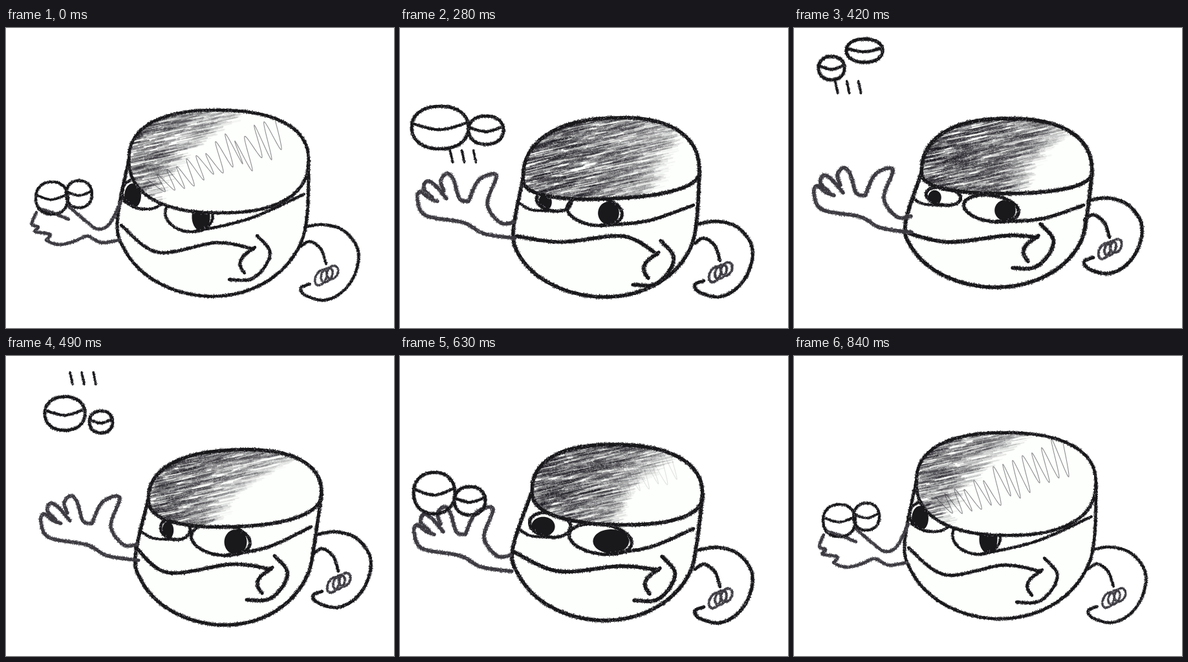
These frames come from a looping animation (600 by 464 pixels, 0.91 s). An HTML page with a canvas:

```html
<!DOCTYPE html>
<html lang="en">
<head>
<meta charset="utf-8">
<title>Juggling pot</title>
<style>
  html, body { margin: 0; width: 100%; height: 100%; overflow: hidden; background: #fff; }
  canvas { display: block; width: 600px; height: 464px; }
</style>
</head>
<body>
<canvas id="stage" width="600" height="464"></canvas>
<script>
const W = 600, H = 464, STEP = 70, TAU = Math.PI * 2;
const INK = "#19181b", SOFT = "#3d3b41";

// The three hands share their point counts, so one can turn into another.
const grip = {
  thumb: [97,276, 112,289, 125,300, 142,311, 160,303, 178,268],
  finger: [47,285, 40,303, 50,308, 45,315, 68,319, 62,328],
  little: [50,279, 62,283, 72,286, 85,291, 97,296],
  wrist: [62,328, 72,333, 85,335, 105,330, 125,322, 138,328, 150,332, 176,328]
};
const fist = {
  thumb: [102,326, 107,308, 116,306, 131,326, 156,320, 182,292],
  finger: [61,318, 66,328, 72,335, 80,337, 88,336, 100,326],
  little: [45,326, 51,333, 58,337, 63,342, 68,347],
  wrist: [62,318, 44,322, 32,350, 50,368, 85,374, 136,350, 155,356, 182,350]
};
const open = {
  thumb: [106,268, 122,235, 149,228, 135,272, 155,301, 177,300],
  finger: [68,252, 63,236, 73,225, 83,235, 92,264, 106,268],
  little: [50,262, 37,249, 41,237, 53,242, 72,264],
  wrist: [58,268, 45,263, 31,253, 27,266, 40,290, 98,301, 130,318, 178,325]
};
const ARM = [462,308, 490,304, 520,312, 541,335, 545,360, 535,390, 515,412, 490,421, 462,413, 456,402, 470,396];
const ELBOW = [456,338, 470,330, 487,342, 495,365];

// dome: left x, y, right x, y, top, bottom; belly: left, right, bottom;
// eyes and balls: centre and radii; shade: reach at top and bottom, tone, loops.
const hold = {
  ink: 4.9, shift: [0, 0], dome: [190,203, 468,205, 127,286], belly: [172,466,415],
  eyeL: [213,256,34,24], eyeR: [283,288,37,27], pupil: 1,
  mouth: [178,305, 235,347, 325,332, 383,342],
  hand: grip, palm: [0, 0], arm: [0, 0],
  ballA: [71,263,25,25], ballB: [113,257,20,21], speed: 0, shade: [.68,.16,.75,1]
};
const dip = {
  ink: 6.6, shift: [0, 0], dome: [205,213, 471,208, 139,284], belly: [175,464,417],
  eyeL: [230,269,36,14], eyeR: [309,300,41,24], pupil: 1,
  mouth: [178,320, 240,340, 340,333, 405,347],
  hand: fist, palm: [0, 0], arm: [4, 9],
  ballA: [65,298,25,20], ballB: [112,300,23,18], speed: 0, shade: [.95,.5,.5,.25]
};
const toss = {
  ink: 5.8, shift: [0, 0], dome: [190,234, 463,222, 139,264], belly: [175,459,416],
  eyeL: [238,267,27,16], eyeR: [301,283,43,22], pupil: 1,
  mouth: [180,322, 250,331, 345,322, 398,350],
  hand: open, palm: [0, 0], arm: [0, -5],
  ballA: [62,154,44,33], ballB: [133,158,27,22], speed: 1, shade: [1,.75,.85,0]
};
const peak = {
  ink: 6, shift: [0, 0], dome: [197,224, 461,222, 140,256], belly: [172,453,401],
  eyeL: [231,260,27,14], eyeR: [305,279,43,20], pupil: 1,
  mouth: [178,318, 240,331, 330,321, 376,324],
  hand: open, palm: [4, -9], arm: [-7, -41],
  ballA: [109,35,28,18], ballB: [58,62,20,18], speed: 1, shade: [1,.6,.9,0]
};
const fall = {
  ink: 5.6, shift: [0, 0], dome: [220,222, 488,212, 145,264], belly: [200,477,416],
  eyeL: [262,267,23,17], eyeR: [332,284,46,24], pupil: 1,
  mouth: [200,295, 250,335, 350,322, 410,330],
  hand: open, palm: [27, -9], arm: [19, -32],
  ballA: [91,89,31,26], ballB: [147,102,18,17], speed: -1, shade: [1,.4,.75,0]
};
const grab = {
  ink: 5.9, shift: [0, 0], dome: [204,210, 468,215, 137,261], belly: [174,459,409],
  eyeL: [232,261,32,19], eyeR: [310,283,49,23], pupil: 1.5,
  mouth: [176,303, 245,333, 340,325, 400,331],
  hand: open, palm: [-5, 8], arm: [0, -8],
  ballA: [53,212,32,32], ballB: [108,224,24,22], speed: 0, shade: [1,.5,.85,.25]
};
const lift = { ...hold, shift: [-1, -8.5] };

// Key poses and the step of the loop at which each is reached.
const keys = [[0, hold], [2, dip], [4, toss], [6, peak], [7, fall], [9, grab], [12, lift]];
const STEPS = 13;

function mix(a, b, t) {
  if (typeof a === "number") return a + (b - a) * t;
  const out = Array.isArray(a) ? [] : {};
  for (const k in a) out[k] = mix(a[k], b[k], t);
  return out;
}

function poseAt(step) {
  const i = Math.max(1, keys.findIndex(k => k[0] >= step));
  const [s0, a] = keys[i - 1], [s1, b] = keys[i];
  return mix(a, b, (step - s0) / (s1 - s0));
}

function random(seed) {
  return () => {
    seed = (seed + 0x6D2B79F5) | 0;
    let r = Math.imul(seed ^ (seed >>> 15), 1 | seed);
    r = (r + Math.imul(r ^ (r >>> 7), 61 | r)) ^ r;
    return ((r ^ (r >>> 14)) >>> 0) / 4294967296;
  };
}

const power = (v, n) => Math.sign(v) * Math.abs(v) ** (2 / n);

function pairs(flat, dx = 0, dy = 0) {
  const out = [];
  for (let i = 0; i < flat.length; i += 2) out.push([flat[i] + dx, flat[i + 1] + dy]);
  return out;
}

// Catmull-Rom curve through the points.
function spline(p) {
  const at = i => p[Math.max(0, Math.min(p.length - 1, i))], out = [];
  for (let i = 0; i < p.length - 1; i++)
    for (let k = 0; k < 12; k++) {
      const t = k / 12;
      out.push([0, 1].map(c => {
        const [a, b, d, e] = [at(i - 1), at(i), at(i + 1), at(i + 2)].map(v => v[c]);
        return b + .5 * t * (d - a + t * (2 * a - 5 * b + 4 * d - e + t * (3 * (b - d) + e - a)));
      }));
    }
  out.push(at(p.length));
  return out;
}

// Closed rounded outline, from a plain ellipse (n = 2) to a boxier one.
function ring([cx, cy, rx, ry], n = 2, tilt = 0) {
  const out = [];
  for (let i = 0; i <= 48; i++) {
    const a = i / 48 * TAU, x = power(Math.cos(a), n) * rx, y = power(Math.sin(a), n) * ry;
    out.push([cx + x * Math.cos(tilt) - y * Math.sin(tilt), cy + x * Math.sin(tilt) + y * Math.cos(tilt)]);
  }
  return out;
}

function domeLine([x0, y0, x1, y1, top, bottom]) {
  const mid = (y0 + y1) / 2;
  return ring([0, 0, 1, 1], 2.35).map(([u, v]) => [
    mix(x0, x1, (u + 1) / 2),
    mix(y0, y1, (u + 1) / 2) + v * (v < 0 ? mid - top : bottom - mid)
  ]);
}

function bellyLine([x0, y0, x1, y1], [left, right, bottom]) {
  const pts = [[x0, y0]], yl = mix(y0, bottom, .45), yr = mix(y1, bottom, .38);
  for (let i = 0; i <= 8; i++) {
    const a = Math.PI * (1 - i / 8), u = (Math.cos(a) + 1) / 2, y = mix(yl, yr, u);
    pts.push([mix(left, right, u), y + Math.sin(a) * (bottom - y)]);
  }
  return spline([...pts, [x1, y1]]);
}

function trace(g, pts) {
  g.beginPath();
  pts.forEach(([x, y]) => g.lineTo(x, y));
}

function crayon(g, pts, width, rnd, color = INK) {
  g.strokeStyle = color;
  g.lineWidth = width * .9;
  trace(g, pts);
  g.stroke();
  for (let i = 1; i < pts.length; i++) {
    const [x, y] = pts[i - 1], dx = pts[i][0] - x, dy = pts[i][1] - y;
    const len = Math.hypot(dx, dy) || 1;
    for (let n = Math.ceil(len * 3); n > 0; n--) {
      const t = rnd(), off = (rnd() - .5) * width * 1.3;
      g.fillStyle = rnd() < .13 ? "#a9a7af" : color;
      g.fillRect(x + dx * t - dy / len * off - .5, y + dy * t + dx / len * off - .5, 1, 1);
    }
  }
}

// Pencil hatching fades from the upper left of the dome, then loose loops.
function hatch(g, [x0, , x1, , y0, y1], [top, bottom, dark, loops], rnd) {
  const w = x1 - x0, h = y1 - y0;
  g.strokeStyle = "#1d1b22";
  for (let i = 0; i < 1500; i++) {
    const u = rnd(), v = rnd();
    const tone = 1 - u / mix(bottom, top, (1 - v) ** 2);
    if (tone <= 0) continue;
    const x = x0 + u * w, y = y0 + v * h, l = 8 + rnd() * 12;
    g.globalAlpha = Math.sqrt(tone) * dark * .5;
    g.lineWidth = 1 + rnd() * 2;
    trace(g, [[x - l, y + l * .22], [x + l, y - l * .22]]);
    g.stroke();
  }
  g.globalAlpha = .5;
  g.fillStyle = "#fff";
  for (let i = 0; i < 4000; i++) g.fillRect(x0 + rnd() * w, y0 + rnd() * h, 1, 1);
  g.globalAlpha = .5 * loops;
  g.lineWidth = 1.1;
  const turns = [];
  for (let i = 0; i <= 26; i++) {
    const s = i / 26, side = i % 2 ? 1 : -1, reach = (.09 + .09 * s) * (.6 + .8 * rnd());
    turns.push([x0 + w * (.14 + .7 * s + side * .035), y0 + h * (.74 - .5 * s + side * reach)]);
  }
  trace(g, spline(turns));
  g.stroke();
  g.globalAlpha = 1;
}

function drawPot(g, p, rnd) {
  const rim = domeLine(p.dome), belly = bellyLine(p.dome, p.belly);
  g.fillStyle = "#fdfffc";
  for (const line of [belly, rim]) {
    trace(g, line);
    g.fill();
  }
  g.save();
  trace(g, rim);
  g.clip();
  hatch(g, p.dome, p.shade, rnd);
  g.restore();

  g.save();
  g.beginPath();
  g.rect(0, -20, W, H + 40);
  rim.forEach(([x, y], i) => i ? g.lineTo(x, y) : g.moveTo(x, y));
  g.clip("evenodd");
  drawEyes(g, p, rnd);
  g.restore();

  crayon(g, rim, p.ink, rnd);
  crayon(g, belly, p.ink, rnd);
}

function drawEyes(g, p, rnd) {
  for (const [eye, side] of [[p.eyeL, -1], [p.eyeR, 1]]) {
    const [x, y, rx, ry] = eye, line = ring(eye, 2, .15);
    g.save();
    trace(g, line);
    g.clip();
    trace(g, ring([x + side * rx * .5 / p.pupil, y + ry * .15, rx * .38 * p.pupil, ry * .8]));
    g.fillStyle = INK;
    g.fill();
    g.restore();
    crayon(g, line, p.ink * .85, rnd);
  }
  const [lx, ly, , lh] = p.eyeL, [rx, ry, rw, rh] = p.eyeR;
  const x = rx + rw * .2, y = ry + rh, endX = p.belly[1] - 5, endY = p.dome[3] + 52;
  crayon(g, spline([[p.belly[0] + 10, ly + lh - 12], [p.belly[0] + 28, ly + lh - 2], [lx, ly + lh]]), p.ink * .7, rnd);
  crayon(g, spline([[x, y], [mix(x, endX, .5), mix(y, endY, .5) + 9], [endX, endY]]), p.ink * .9, rnd);
}

function drawMouth(g, p, rnd) {
  const [x, y] = p.mouth.slice(-2);
  const tick = [2,-3, -17,12, -21,25, -14,37];
  const cheek = [5,-21, 25,3, 16,29, -6,47, -38,47];
  crayon(g, spline(pairs(p.mouth)), p.ink, rnd);
  crayon(g, spline(pairs(tick, x, y)), p.ink, rnd);
  crayon(g, spline(pairs(cheek, x, y)), p.ink, rnd);
}

function drawArms(g, p, rnd) {
  for (const k in p.hand) crayon(g, spline(pairs(p.hand[k], ...p.palm)), p.ink, rnd, SOFT);
  const [dx, dy] = p.arm;
  crayon(g, spline(pairs(ARM, dx, dy)), p.ink * .9, rnd);
  crayon(g, spline(pairs(ELBOW, dx, dy)), p.ink * .85, rnd);
  for (let i = 0; i < 3; i++)
    crayon(g, ring([487 + i * 9 + dx, 386 - i * 4 + dy, 8, 13 - i], 2, .5), p.ink * .6, rnd, SOFT);
}

function drawBalls(g, p, rnd) {
  const balls = [p.ballA, p.ballB];
  for (const [x, y, rx, ry] of balls) {
    crayon(g, ring([x, y, rx, ry], 2.2), p.ink * .85, rnd);
    crayon(g, spline([[x - rx, y - ry * .2], [x, y + ry * .1], [x + rx, y - ry * .25]]), p.ink * .75, rnd);
  }
  if (Math.abs(p.speed) < .3) return;
  const mid = (balls[0][0] + balls[1][0]) / 2;
  const y = p.speed > 0
    ? Math.max(...balls.map(b => b[1] + b[3])) + 2
    : Math.min(...balls.map(b => b[1] - b[3])) - 38;
  for (let i = -1; i < 2; i++)
    crayon(g, [[mid + i * 18 - 2, y], [mid + i * 18 + 2, y + 19]], p.ink * .6, rnd);
}

function render(step) {
  const page = document.createElement("canvas");
  page.width = W;
  page.height = H;
  const g = page.getContext("2d"), rnd = random(40 + step), p = poseAt(step);
  g.fillStyle = "#fff";
  g.fillRect(0, 0, W, H);
  g.lineCap = g.lineJoin = "round";
  g.translate(...p.shift);
  for (const draw of [drawPot, drawMouth, drawArms, drawBalls]) draw(g, p, rnd);
  return page;
}

const stage = document.getElementById("stage").getContext("2d");
const pages = Array.from({ length: STEPS }, (_, i) => render(i));
let shown = -1;

function tick() {
  const i = Math.floor(performance.now() / STEP) % STEPS;
  if (i !== shown) stage.drawImage(pages[shown = i], 0, 0);
  requestAnimationFrame(tick);
}
tick();
</script>
</body>
</html>
```
